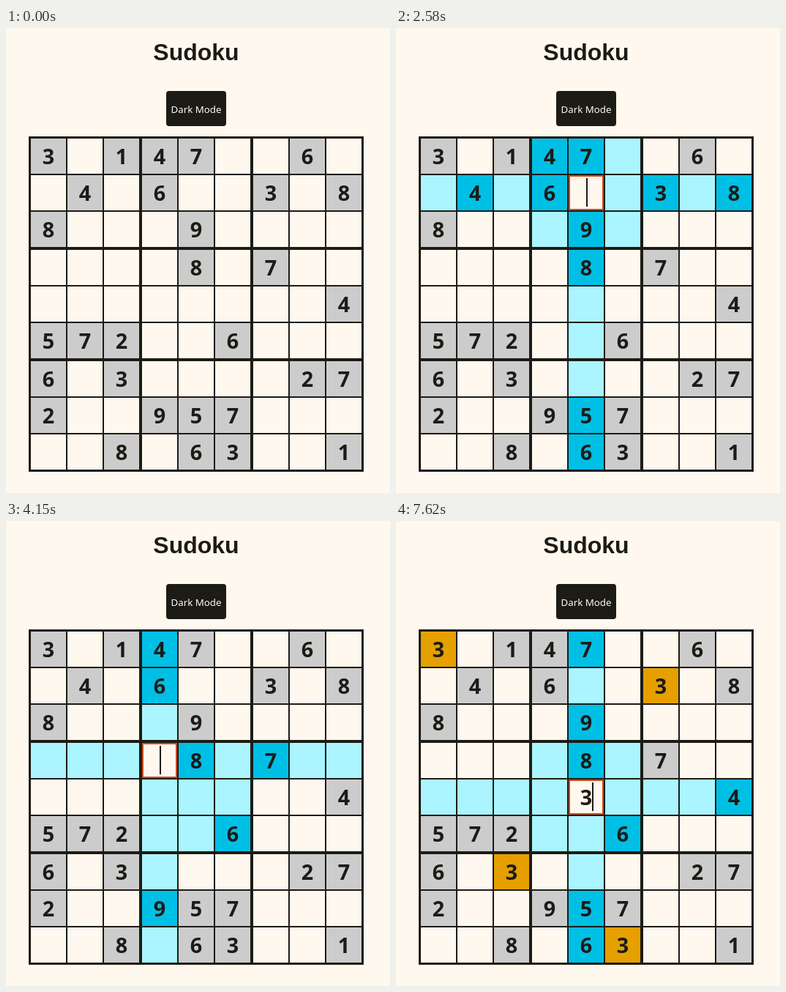
An HTML page with a canvas for the animation above (8000 ms loop, 525 px wide and 635 px high).

```html
<!DOCTYPE html>
<html lang="en">
<head>
<meta charset="utf-8">
<title>Sudoku</title>
<style>
html, body { margin: 0; width: 100%; height: 100%; overflow: hidden; background: #fff8ee; }
canvas { display: block; }
</style>
</head>
<body>
<canvas id="stage" width="525" height="635"></canvas>
<script>
const ctx = document.getElementById("stage").getContext("2d");
const LOOP = 8000, LEFT = 34, TOP = 151, CELL = 48;
const PAPER = "#fff8ee", INK = "#1c1b16", GIVEN = "#cccccc";
const PEER = "#aaf5ff", PEER_GIVEN = "#00bfe5", SAME = "#e5a000", FOCUS = "#cf4a1d";

const board = [
  "3.147..6.",
  ".4.6..3.8",
  "8...9....",
  "....8.7..",
  "........4",
  "572..6...",
  "6.3....27",
  "2..957...",
  "..8.63..1"
];

// time, row, column of each click
const clicks = [
  [1170, 0, 1], [1840, 0, 5], [2170, 1, 5], [2580, 1, 4], [2940, 4, 4],
  [3410, 4, 5], [3810, 3, 5], [4150, 3, 3], [4560, 4, 3], [5210, 4, 4]
];
const TYPED_AT = 5880, CARET_OFF = 6370, CARET_ON = 7620;

const offset = i => i * 50 + 2 * Math.floor(i / 3);
const block = i => Math.floor(i / 3);

function rect(color, x, y, w, h) {
  ctx.fillStyle = color;
  ctx.fillRect(x, y, w, h);
}

function label(text, x, y, font, color) {
  ctx.font = font;
  ctx.fillStyle = color;
  ctx.fillText(text, x, y);
}

function cellColor(r, c, sel, typed) {
  const given = board[r][c] !== ".";
  if (sel) {
    const [, sr, sc] = sel;
    if (r === sr && c === sc) return PAPER;
    if (typed && board[r][c] === typed) return SAME;
    const near = block(r) === block(sr) && block(c) === block(sc);
    if (r === sr || c === sc || near) return given ? PEER_GIVEN : PEER;
  }
  return given ? GIVEN : PAPER;
}

function drawFocus(x, y, typed, caret) {
  ctx.strokeStyle = FOCUS;
  ctx.lineWidth = 2;
  ctx.strokeRect(x + 1, y + 1, CELL - 2, CELL - 2);
  if (caret) rect(INK, x + (typed ? 32 : 24), y + 4, 2, 39);
}

function draw(t) {
  const sel = clicks.filter(c => c[0] <= t).pop();
  const typed = t >= TYPED_AT ? "3" : "";
  const caret = t < CARET_OFF || t >= CARET_ON;

  rect(PAPER, 0, 0, 525, 635);
  ctx.textAlign = "center";
  label("Sudoku", 260, 44, 'bold 32px "Liberation Sans", Arial, sans-serif', INK);

  ctx.fillStyle = INK;
  ctx.beginPath();
  ctx.roundRect(219, 86, 82, 48, 4);
  ctx.fill();
  label("Dark Mode", 260, 116, '13.333px "Noto Sans", sans-serif', PAPER);

  rect(INK, LEFT - 3, TOP - 3, 458, 458);
  for (let r = 0; r < 9; r++) {
    for (let c = 0; c < 9; c++) {
      const x = LEFT + offset(c), y = TOP + offset(r);
      const active = sel && sel[1] === r && sel[2] === c;
      const digit = active ? typed : board[r][c].replace(".", "");
      rect(cellColor(r, c, sel, typed), x, y, CELL, CELL);
      if (digit) label(digit, x + 24, y + 35, 'bold 28.8px "Noto Sans", sans-serif', INK);
      if (active) drawFocus(x, y, typed, caret);
    }
  }
}

const start = performance.now();
function tick() {
  draw((performance.now() - start) % LOOP);
  requestAnimationFrame(tick);
}
tick();
</script>
</body>
</html>
```
